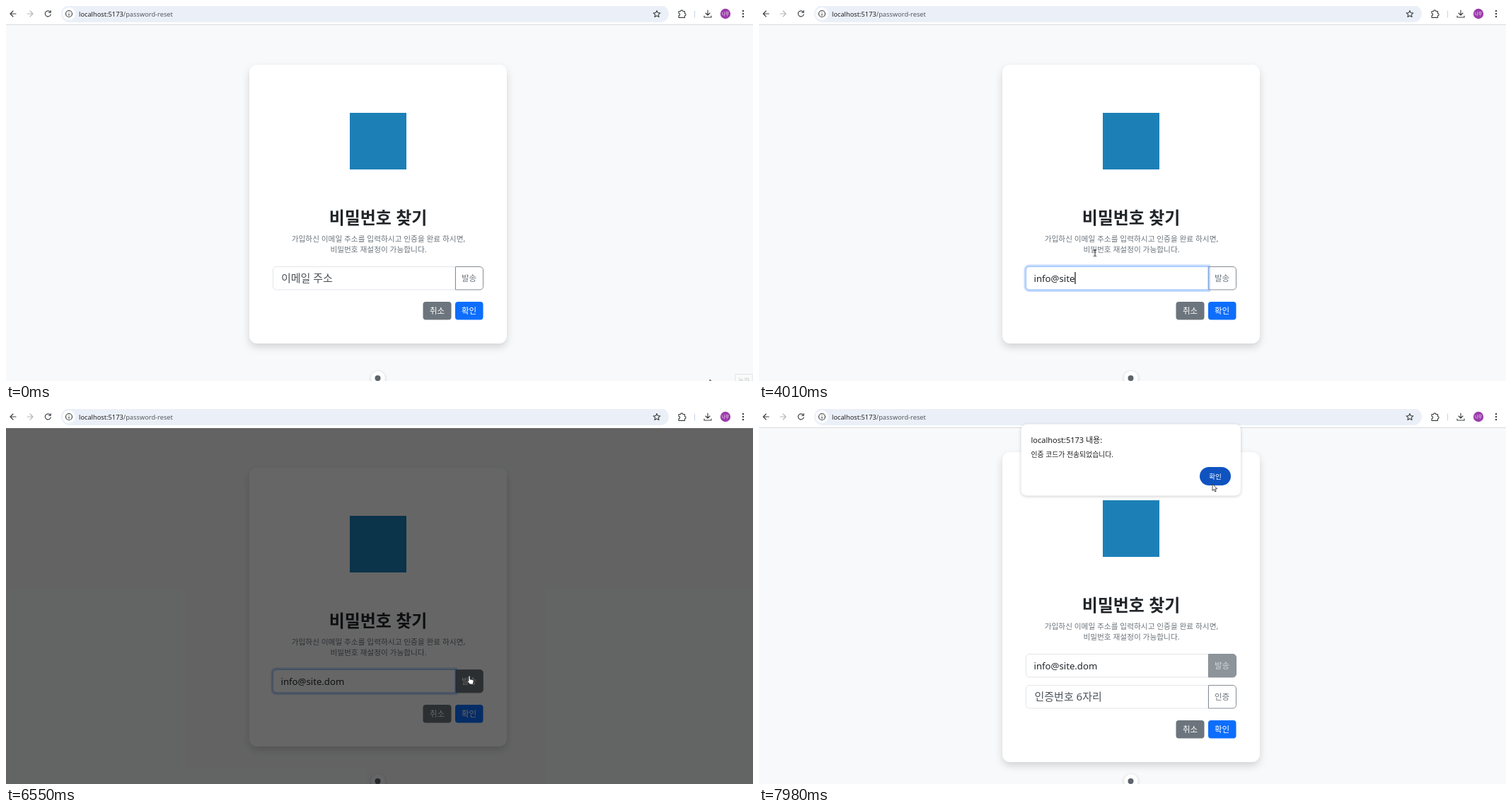
An HTML page for the animation above (8 s loop, 1056 px wide and 530 px high).

```html
<!DOCTYPE html>
<html lang="ko">
<head>
<meta charset="utf-8">
<title>비밀번호 찾기</title>
<style>
  html, body { margin: 0; width: 100%; height: 100%; overflow: hidden; background: #f8f9fb; }
  svg { display: block; }
  text { font-family: "Noto Sans", "Noto Sans CJK KR", "Noto Sans CJK", sans-serif; }
  .mid { text-anchor: middle; }
  .title { font-size: 24px; font-weight: 700; fill: #212529; }
  .hint { font-size: 10.7px; fill: #6c757d; }
  .placeholder { font-size: 15px; fill: #4d545b; }
  .btn { font-size: 11.5px; fill: #fff; }
  .outline { fill: #6c757d; }
  .email { font-size: 13.2px; fill: #212529; }
  .field { fill: #fff; stroke: #e2e5e9; }
  .edge { fill: #fff; stroke: #868e95; }
  .icon { fill: none; stroke: #3c4043; stroke-width: 1.15; stroke-linecap: round; stroke-linejoin: round; }
  .card { filter: drop-shadow(0 5px 5.5px rgba(0, 0, 0, .15)); }
  .soft { filter: drop-shadow(0 1px 2px rgba(0, 0, 0, .2)); }
</style>
</head>
<body>
<svg width="1056" height="530" viewBox="0 0 1056 530">
  <defs>
    <path id="fieldShape" d="M635 368.5H382a4.5 4.5 0 0 0-4.5 4.5v23.5a4.5 4.5 0 0 0 4.5 4.5H635z"/>
    <path id="sideShape" d="M635.5 368.5H670a4.500 4.500 0 0 1 4.500 4.500v23.500a4.500 4.500 0 0 1-4.500 4.500H635.500z"/>
  </defs>
  <rect width="1056" height="530" fill="#f8f9fb"/>

  <g id="page">
    <rect id="card" class="card" x="344" y="83" width="364" height="394" rx="11" fill="#fff"/>
    <rect x="486" y="151" width="80" height="80" fill="#1c80b7"/>
    <text class="title mid" x="526" y="307.5">비밀번호 찾기</text>
    <text class="hint mid" x="526.5" y="333">가입하신 이메일 주소를 입력하시고 인증을 완료 하시면,</text>
    <text class="hint mid" x="526.5" y="348">비밀번호 재설정이 가능합니다.</text>

    <use href="#fieldShape" class="field"/>
    <use href="#sideShape" id="sendBox" class="edge"/>
    <text id="sendLabel" class="btn mid" x="654.5" y="389">발송</text>
    <g id="focus" fill="none">
      <path stroke="#0d6efd" stroke-opacity=".25" stroke-width="3" d="M636.5 367H382a6 6 0 0 0-6 6v23.5a6 6 0 0 0 6 6H636.5z"/>
      <use href="#fieldShape" stroke="#9dc4fe"/>
    </g>
    <text id="placeholder" class="placeholder" x="389" y="390">이메일 주소</text>
    <text id="email" class="email" x="388.5" y="390"></text>
    <rect id="caret" y="376" width="1.2" height="17" fill="#111"/>

    <g id="codeRow">
      <use href="#fieldShape" y="44" class="field"/>
      <use href="#sideShape" y="44" class="edge"/>
      <text class="placeholder" x="389.5" y="434">인증번호 6자리</text>
      <text class="btn outline mid" x="654.5" y="433">인증</text>
    </g>

    <g id="actions">
      <rect x="589.5" y="418" width="40" height="25.5" rx="4" fill="#6c757d"/>
      <rect x="635" y="418" width="39.5" height="25.5" rx="4" fill="#0d6efd"/>
      <text class="btn mid" x="609.5" y="435">취소</text>
      <text class="btn mid" x="654.5" y="435">확인</text>
    </g>
  </g>

  <circle class="soft" cx="526" cy="526" r="10" fill="#fff"/>
  <circle cx="525.5" cy="526" r="4" fill="#5c646b"/>
  <g id="tip">
    <rect x="1031" y="520.5" width="24" height="14" fill="#fafafa" stroke="#e0e3e6"/>
    <text x="1035" y="533" font-size="9" fill="#c3c7cc">녹화</text>
  </g>

  <rect id="shade" y="27" width="1056" height="503" fill="#000" fill-opacity=".6"/>

  <g id="toolbar">
    <rect width="1056" height="27" fill="#fff"/>
    <rect id="divider" y="26" width="1056" height="1" fill="#d8dbdf"/>
    <rect x="78" y="-1" width="859" height="24" rx="12" fill="#ebf0f8"/>
    <circle cx="89" cy="11" r="9" fill="#fff"/>
    <g class="icon">
      <path d="M14 11H6m4-4-4 4 4 4"/>
      <path stroke="#b4b7ba" d="M30 11h8m-4-4 4 4-4 4"/>
      <path d="M62.5 8.500a4 4 0 1 0 .7 3.300M63.200 6.500v2.700h-2.700"/>
      <circle cx="89" cy="11" r="4.5"/>
      <path d="M89 11v2.3M89 8.7v.1"/>
      <path d="m920 6.5 1.4 3 3.4.4-2.5 2.3.7 3.3-3-1.7-3 1.7.7-3.3-2.5-2.3 3.4-.4z"/>
      <path d="M951 7.5h2.7a1.6 1.6 0 0 1 3.2 0h2.6v3a1.6 1.6 0 0 1 0 3.2v2.6H951v-2.8a1.6 1.6 0 0 0 0-3.2z"/>
      <path stroke="#c9d6ea" d="M973.5 7v9"/>
      <path d="M992 6v6.5m-3-2.5 3 3 3-3m-8 4v2h10v-2"/>
    </g>
    <circle cx="1017" cy="11" r="7.2" fill="#9b3cab"/>
    <text class="mid" x="1017" y="13.2" font-size="5.5" fill="#fff">나무</text>
    <g fill="#3c4043"><circle cx="1042" cy="7" r="1.2"/><circle cx="1042" cy="11" r="1.2"/><circle cx="1042" cy="15" r="1.2"/></g>
    <text x="103" y="15" font-size="9.25" fill="#202124">localhost:5173<tspan fill="#555a60">/password-reset</tspan></text>
  </g>

  <g id="dialog">
    <rect class="soft" x="370.5" y="25.5" width="310.5" height="101" rx="8" fill="#fff"/>
    <text x="384.5" y="51.5" font-size="11" fill="#1f1f1f">localhost:5173 내용:</text>
    <text x="384.5" y="71.5" font-size="9.85" fill="#1f1f1f">인증 코드가 전송되었습니다.</text>
    <rect id="ring" x="620.7" y="83.7" width="48.2" height="30.4" rx="15.2" fill="none" stroke="#0b57d0" stroke-width="1.5"/>
    <rect id="okBox" x="623" y="86" width="44" height="26" rx="13"/>
    <text class="mid" x="645" y="102.5" font-size="9.5" fill="#fff">확인</text>
  </g>

  <circle id="click" r="8.5" fill="#dfd60c" fill-opacity=".78"/>
  <g id="cursor">
    <path id="arrow" fill="#fff" stroke="#222" stroke-width=".8" d="M0 0v9.5l2.2-2 1.5 3.4 1.5-.7-1.5-3.3H6.7z"/>
    <path id="beam" fill="none" stroke="#333" d="M-2-4.5h1.3L0-4l.7-.5H2M0-4v8M-2 4.5h1.3L0 4l.7.5H2"/>
    <path id="hand" fill="#fff" stroke="#222" stroke-width=".7" d="M-1 1a1 1 0 0 1 2 0v4l4 .8q1.2.4 1 1.7l-.8 4.5H.5l-3-4q-.6-1.2.6-1.2l.9.6z"/>
  </g>
</svg>

<script>
const LOOP = 8000;
const EMAIL = "info@site.dom";
const KEY_TIMES = [1200, 1540, 1810, 2140, 2950, 3350, 3680, 3810, 4010, 4610, 4810, 4940, 5270];
const FOCUS = 590, SEND = 6470, ALERT = 6550, OPEN = 6620, CONFIRM = 7840, DONE = 7980;

// time, x, y of the pointer's hot spot
const POINTER = [
  [70, 995, 528], [260, 448, 376], [FOCUS, 448, 376], [870, 475, 349],
  [5800, 475, 349], [6400, 655, 377], [OPEN, 655, 377], [7310, 643, 107],
  [7510, 644, 101], [7910, 644, 101], [DONE, 641, 106]
];

const el = {};
document.querySelectorAll("[id]").forEach(node => el[node.id] = node);

const clamp = v => Math.max(0, Math.min(1, v));
const ramp = (t, start, length) => clamp((t - start) / length);
const smooth = p => p * p * (3 - 2 * p);
const within = (t, start, end) => t >= start && t < end;
const show = (node, visible) => node.style.display = visible ? "" : "none";
const move = (node, x, y) => node.setAttribute("transform", `translate(${x} ${y})`);

function pointerAt(t) {
  const next = POINTER.findIndex(k => k[0] > t);
  if (next === 0) return POINTER[0].slice(1);
  if (next < 0) return POINTER[POINTER.length - 1].slice(1);
  const [t0, x0, y0] = POINTER[next - 1], [t1, x1, y1] = POINTER[next];
  const p = smooth((t - t0) / (t1 - t0));
  return [x0 + (x1 - x0) * p, y0 + (y1 - y0) * p];
}

function drawForm(t) {
  const done = t >= DONE;
  const typed = KEY_TIMES.filter(k => k <= t);
  move(el.page, 0, done ? -22 : 0);
  move(el.actions, 0, done ? 44 : 0);
  el.card.setAttribute("height", done ? 438 : 394);
  show(el.codeRow, done);

  el.email.textContent = EMAIL.slice(0, typed.length);
  show(el.placeholder, !typed.length);
  el.focus.style.opacity = done ? 0 : ramp(t, FOCUS, 150);

  const lastInput = typed.length ? typed[typed.length - 1] : FOCUS;
  const caretOn = within(t, FOCUS, SEND) && Math.floor((t - lastInput) / 520) % 2 === 0;
  show(el.caret, caretOn);
  el.caret.setAttribute("x", 388.5 + (typed.length ? el.email.getComputedTextLength() : 0));

  const hover = ramp(t, 6340, 130);
  const hoverFill = `rgb(${[108, 117, 125].map(c => 255 + (c - 255) * hover)})`;
  el.sendBox.style.fill = done ? "#8d959b" : hoverFill;
  el.sendLabel.style.fill = done ? "#d3d7da" : hover > .5 ? "#fff" : "#6c757d";
}

function drawDialog(t) {
  const done = t >= DONE;
  const blocked = within(t, ALERT, DONE);
  const enter = smooth(ramp(t, OPEN - 40, 140));
  show(el.shade, blocked);
  show(el.divider, !blocked);
  show(el.dialog, t >= OPEN);
  el.dialog.style.opacity = enter;
  move(el.dialog, 0, done ? -4 : -4 * (1 - enter));
  show(el.ring, !done);
  el.okBox.setAttribute("fill", within(t, 7380, DONE) ? "#1f60c4" : "#0f53c0");
}

function drawPointer(t) {
  const [x, y] = pointerAt(t);
  const kind = t < 200 || t >= OPEN ? "arrow" : x < 635 ? "beam" : "hand";
  for (const name of ["arrow", "beam", "hand"]) show(el[name], name === kind);
  move(el.cursor, x, y);
  move(el.click, x, y);
  show(el.click, [FOCUS, SEND, CONFIRM].some(start => within(t, start, start + 70)));
  show(el.tip, t < 140);
}

const start = performance.now();
function frame() {
  const t = (performance.now() - start) % LOOP;
  drawForm(t);
  drawDialog(t);
  drawPointer(t);
  requestAnimationFrame(frame);
}
frame();
</script>
</body>
</html>
```
